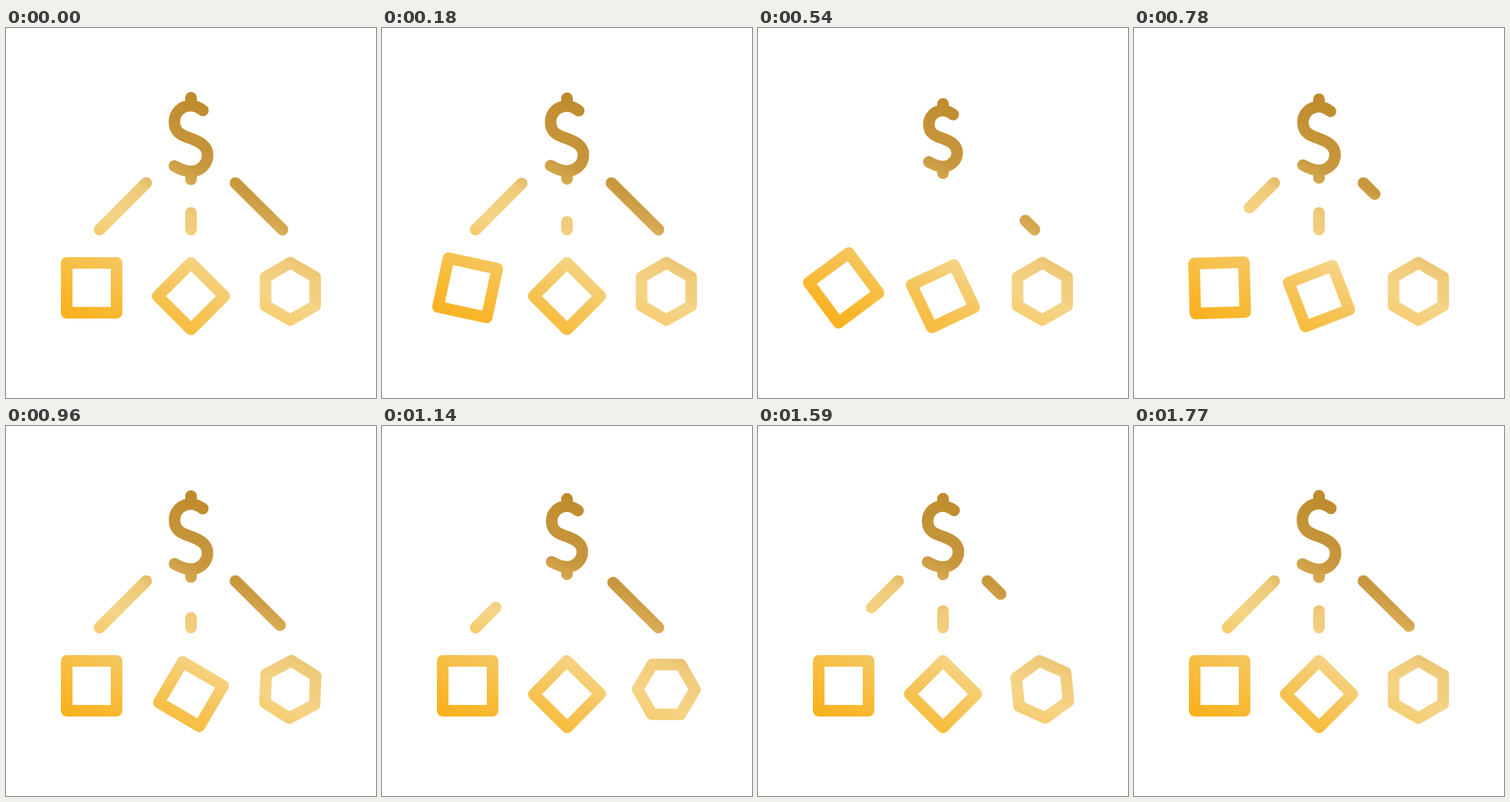
An HTML page with a canvas for the animation above (1800 ms loop, 512x512 px).

```html
<!DOCTYPE html>
<html lang="en">
<head>
<meta charset="utf-8">
<title>Dollar splitting into shapes</title>
<style>
html, body { margin: 0; width: 100%; height: 100%; overflow: hidden; background: #fff; }
canvas { display: block; width: 100vmin; height: 100vmin; }
</style>
</head>
<body>
<canvas id="stage" width="512" height="512"></canvas>
<script>
const ctx = document.getElementById('stage').getContext('2d');
const LOOP = 1800, STEP = 30, CYCLE = 800;

const clamp = x => Math.min(1, Math.max(0, x));
const smooth = x => x * x * (3 - 2 * x);
const progress = (t, start, end) => smooth(clamp((t - start) / (end - start)));

// Bezier ease for the turning shapes, solved by bisection
function turnEase(x) {
  let lo = 0, hi = 1;
  for (let i = 0; i < 24; i++) {
    const s = (lo + hi) / 2, r = 1 - s;
    if (1.6 * s * r * r + 1.194 * s * s * r + s * s * s < x) lo = s;
    else hi = s;
  }
  return smooth(lo);
}

// One gold gradient across the whole stage
const gold = ctx.createLinearGradient(16, -32, -148, 296);
[[0, '#be8a2b'], [.24, '#c8983f'], [.31, '#d6a950'], [.41, '#efca79'],
 [.55, '#f6d486'], [.7, '#f5c55c'], [.83, '#f8bc3a'], [1, '#f9ae18']]
  .forEach(([at, color]) => gold.addColorStop(at, color));

const dollar = new Path2D(
  'M16.5-39C11-43 5-45.5 0-45.5C-13-45.5-23-36-23-23C-23-8-12-4 0 0' +
  'C12 4.5 23 10 23 23C23 36 12 45.5 0 45.5C-8 45.5-16 42-23 38' +
  'M0-56.5V-45.5M0 56.5V45.5');

// The symbol shrinks while its stroke keeps its width
function drawDollar(t) {
  const shrink = progress(t, 100, 560) - progress(t, 560, 880)
               + progress(t, 890, 1380) - progress(t, 1380, 1790);
  const k = 1 - .15 * shrink;
  const path = new Path2D();
  path.addPath(dollar, { a: k, b: 0, c: 0, d: k, e: 256, f: 153 });
  ctx.stroke(path);
}

// Runs out towards its lower end, then grows again from the top
function drawLine(t, { from: [x1, y1], to: [x2, y2], leave, enter }) {
  const u = t >= CYCLE + leave[0] ? t - CYCLE : t;
  const gone = u >= leave[1];
  if (gone && u <= enter[0]) return;
  const a = gone ? 0 : progress(u, ...leave);
  const b = gone ? progress(u, ...enter) : 1;
  ctx.beginPath();
  ctx.moveTo(x1 + (x2 - x1) * a, y1 + (y2 - y1) * a);
  ctx.lineTo(x1 + (x2 - x1) * b, y1 + (y2 - y1) * b);
  ctx.stroke();
}

// Each shape makes one half turn
function drawShape(t, { sides, x, y, r, base, start }) {
  const turn = base + Math.PI * turnEase(clamp((t - start) / 860));
  ctx.beginPath();
  for (let i = 0; i < sides; i++) {
    const a = turn + i * 2 * Math.PI / sides;
    ctx.lineTo(x + r * Math.sin(a), y - r * Math.cos(a));
  }
  ctx.closePath();
  ctx.stroke();
}

const lines = [
  { from: [194, 214.5], to: [129.5, 279], leave: [160, 490], enter: [609, 939] },
  { from: [256, 256], to: [256, 279], leave: [40, 310], enter: [540, 780] },
  { from: [317.5, 214.5], to: [382.5, 279], leave: [303, 633], enter: [675, 1005] }
];
const shapes = [
  { sides: 4, x: 118.5, y: 359.5, r: 48.8, base: Math.PI / 4, start: 0 },
  { sides: 4, x: 256, y: 371, r: 46, base: 0, start: 320 },
  { sides: 6, x: 393.5, y: 364.5, r: 39.6, base: 0, start: 877 }
];

function draw(t) {
  ctx.fillStyle = '#fff';
  ctx.fillRect(0, 0, 512, 512);
  ctx.strokeStyle = gold;
  ctx.lineWidth = 16;
  ctx.lineCap = ctx.lineJoin = 'round';
  drawDollar(t);
  lines.forEach(line => drawLine(t, line));
  shapes.forEach(shape => drawShape(t, shape));
}

const begin = performance.now();
function tick() {
  const t = (performance.now() - begin) % LOOP;
  draw(Math.floor(t / STEP) * STEP);
  requestAnimationFrame(tick);
}
tick();
</script>
</body>
</html>
```
